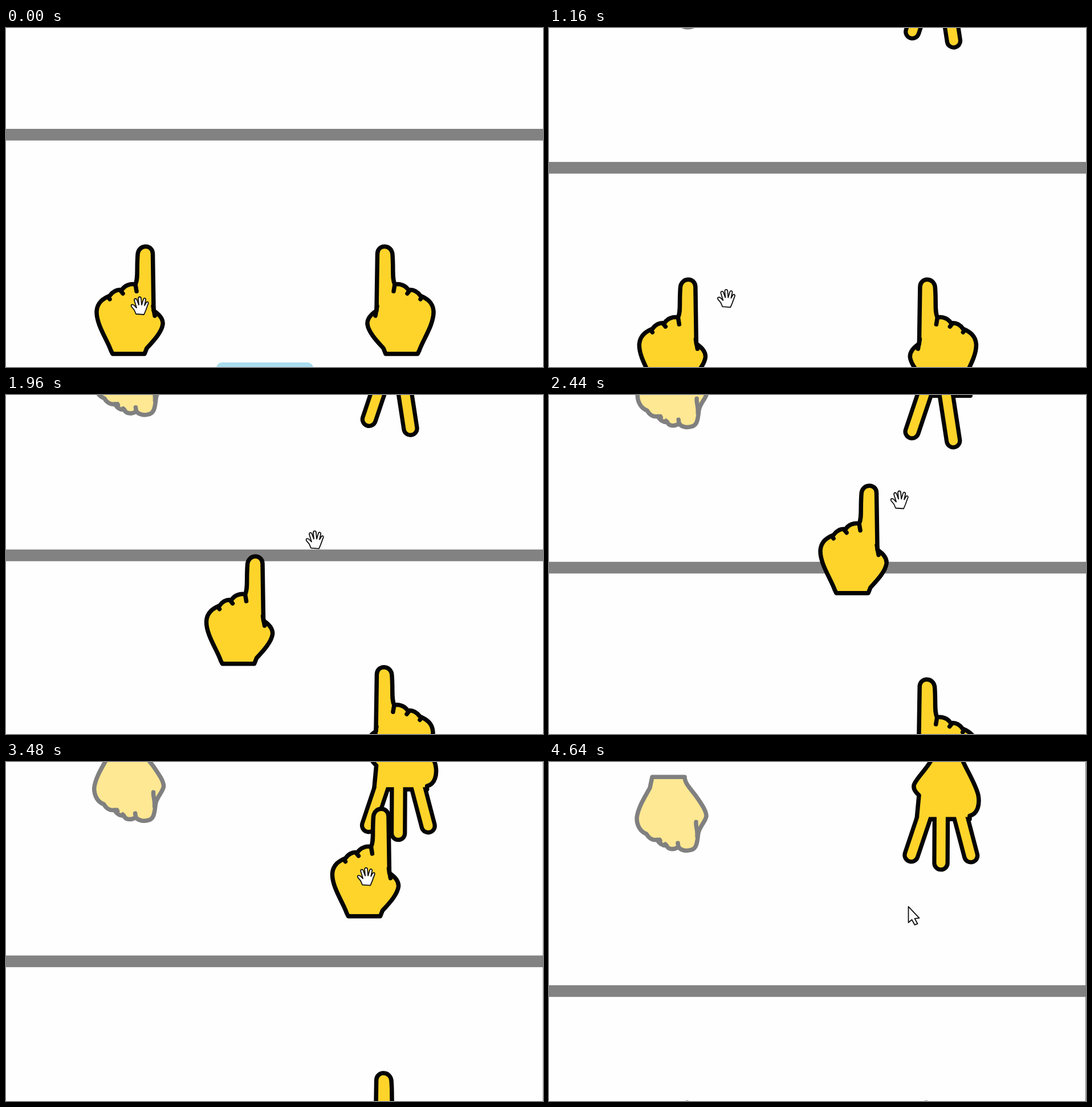
An HTML page that plays this animation: 942 px wide and 595 px high, repeating every 4.74 s.

```html
<!DOCTYPE html>
<html lang="en">
<head>
<meta charset="utf-8">
<title>Finger game</title>
<style>
  html, body { margin: 0; width: 100%; height: 100%; overflow: hidden; background: #fefefe; }
  svg { display: block; width: 100vw; height: 100vh; }
  .hand { fill: #ffd42a; stroke: #050505; stroke-width: 7.5; stroke-linejoin: round; stroke-linecap: round; }
  .finger { stroke-width: 30.5; }
  .skin { stroke: #ffd42a; stroke-width: 16; }
  .pointer { fill: #fff; stroke: #111; stroke-width: 1.8; stroke-linejoin: round; }
</style>
</head>
<body>
<svg viewBox="0 0 942 595">
  <defs>
    <g id="point" class="hand">
      <path d="M187 572 L184 566 C178 548 158 520 159 497 C160 482 170 475 182 470
        C186 464 194 458 203 460 C208 452 218 448 227 450 C232 440 229 425 231 398
        C232 379 257 379 257.5 396 L259 496 C268 502 276 510 275 520
        C273 535 256 552 247 562 L243 572 Z"/>
      <path d="M179 472 l3 4 M201 461 l4 5 M227 450 l2 12 M258 488 l3 17"/>
    </g>
  </defs>

  <!-- y = 0 is the top edge of the divider -->
  <g id="page">
    <rect x="-5" width="960" height="20.5" fill="#828282"/>
    <rect x="943.5" y="-400" width="1" height="1000" fill="#777"/>
    <rect x="369" y="410" width="170" height="60" rx="10" fill="#a9dcee"/>

    <g transform="translate(2.5 -391.5)" class="hand">
      <g opacity=".5">
        <path d="M181 26 H238 C238 38 250 48 259 61 C267 73 276 85 276 95
          C274 105 265 112 262 124 C260 138 260 152 249 154 C240 157 231 154 227 149
          C220 154 209 154 206 146 C200 147 193 143 190 136 C182 138 175 133 171 126
          C160 122 154 111 154 98 C156 79 169 60 177 45 Z"/>
        <path fill="none" d="M258 105 C257 112 261 118 260 130 M227 149 l-1 -7 M206 146 l-2 -2 M195 138 l-1 -2"/>
      </g>
      <path class="finger"/>
      <path d="M672 -6 C664 10 650 22 642 36 C637 44 642 52 649 58 L645 100 H738 V94
        C752 91 756 74 753 58 C749 40 736 20 724 -6 Z"/>
      <path class="finger skin"/>
    </g>

    <use href="#point" transform="translate(909 -177) scale(-1 1)"/>
    <g id="drag"><use href="#point" y="-177"/></g>

    <g id="cursor" class="pointer">
      <path id="palm" d="M-6 14 L-9 7 L-14 1 C-16 -3 -11 -4 -8 0 L-5 3 L-9 -10
        C-9 -14 -5 -14 -4 -10 L-1 -2 L-2 -13 C-2 -17 3 -17 3 -13 L4 -2 L7 -12
        C8 -15 12 -14 11 -10 L9 -1 L12 -6 C14 -9 17 -7 15 -3 L11 8 L8 15 Z"/>
      <path id="arrow" d="M0 0 V28 L6 23 L11 32 L16 30 L11 21 L19 20 Z"/>
    </g>
  </g>
</svg>
<script>
  const LOOP = 4740, STEP = 40, LAST = 4640;
  const GRAB = 760, BACK = 3080, HIT = 3320, DROP = 3560, LAG = 430;
  const home = { x: 234, y: 311 }, peak = { x: 658, y: -164 }, rest = { x: 633, y: -138 };

  const LEFT = 'M662 84 L635.5 163 ';
  const TWO = LEFT + 'M694 88 L708 179';
  const THREE = LEFT + 'M688 84 L687.5 177 M719 84 L740 164';

  const el = id => document.getElementById(id);
  const fingers = document.querySelectorAll('.finger');
  const move = (id, x, y) => el(id).setAttribute('transform', `translate(${x} ${y})`);
  const show = (id, on) => el(id).style.display = on ? '' : 'none';
  const mix = (a, b, k) => a + (b - a) * k;
  const clamp = v => Math.max(0, Math.min(1, v));

  // starts softly, then settles
  const settle = (t, span, power) => 1 - Math.exp(-((Math.max(0, t - GRAB) / span) ** power));

  const scroll = t => 183 + 0.045 * t - 6 * Math.exp(-t / 300);

  function pointer(t) {
    const k = clamp((t - BACK) / 400), back = k * k * (3 - 2 * k);
    return {
      x: mix(mix(home.x, peak.x, settle(t, 1030, 1.7)), rest.x, back),
      y: mix(mix(home.y, peak.y, settle(t, 1100, 1.8)), rest.y, back)
    };
  }

  function draw(time) {
    const t = Math.min(Math.floor(time % LOOP / STEP) * STEP, LAST);
    const dragging = t < DROP;
    const at = pointer(t);
    const held = dragging ? pointer(t - LAG) : home; // the hand trails the pointer

    move('page', -2.5 * t / LAST, scroll(t));
    move('cursor', at.x, at.y);
    move('drag', held.x - home.x, held.y - home.y);
    show('palm', dragging);
    show('arrow', !dragging);
    fingers.forEach(f => f.setAttribute('d', t < HIT ? TWO : THREE));
  }

  const start = performance.now();
  function tick() {
    draw(performance.now() - start);
    requestAnimationFrame(tick);
  }
  tick();
</script>
</body>
</html>
```
